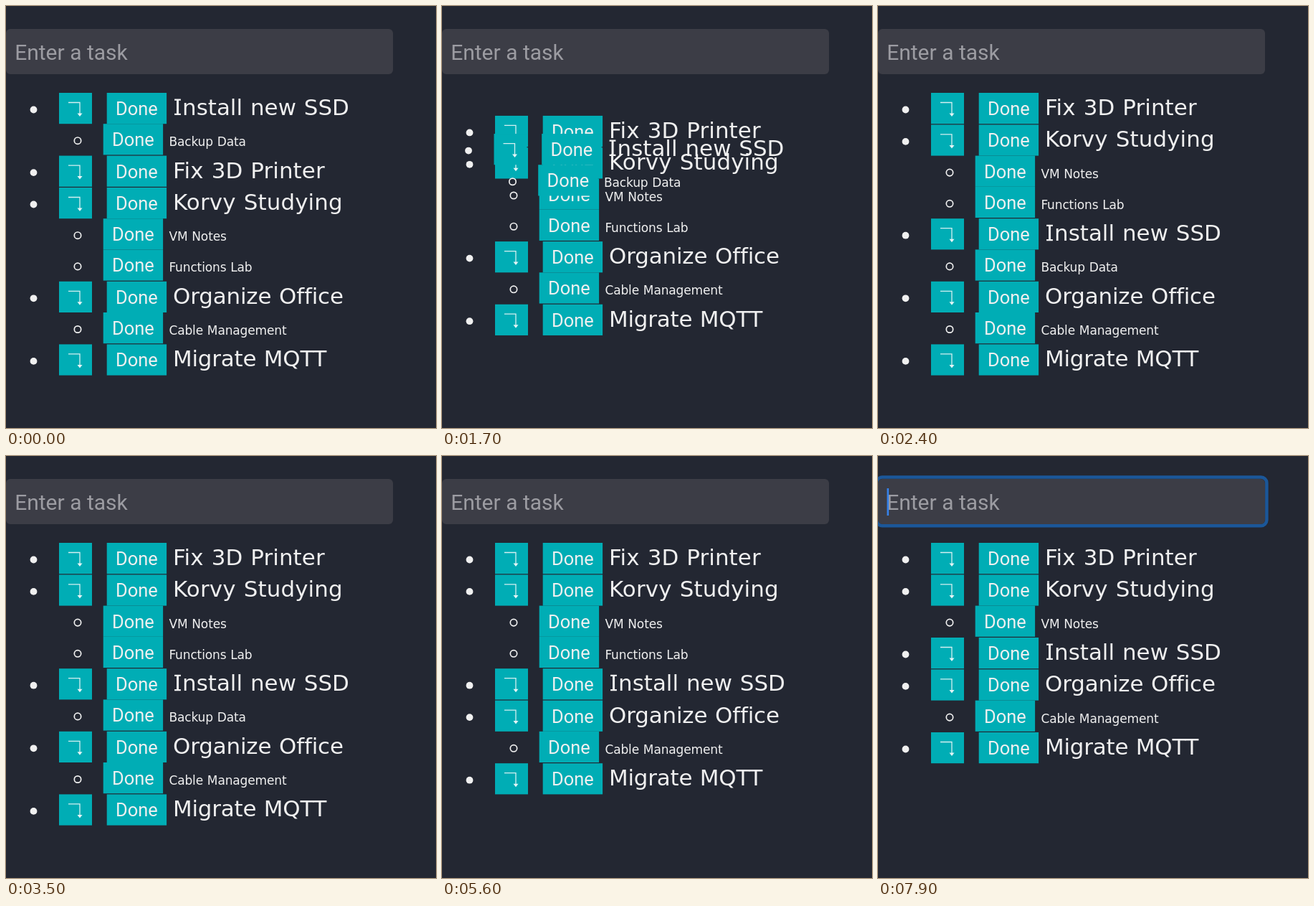
Write an HTML page that moves like this. It is 600x588 px and loops after 8000 ms.

```html
<!DOCTYPE html>
<html lang="en">
<head>
<meta charset="utf-8">
<title>Task list</title>
<style>
  html, body { margin: 0; width: 100%; height: 100%; overflow: hidden; background: #232732; }
  svg { display: block; width: 100%; height: 100%; }
  text { fill: #f0f0f0; font-kerning: none; font-variant-ligatures: none; white-space: pre; }
  .task { font: 30.9px "DejaVu Sans", Verdana, sans-serif; word-spacing: .034em; }
  .sub { font: 17px "DejaVu Sans", Verdana, sans-serif; word-spacing: .034em; letter-spacing: -.13px; }
  .done { font: 25.4px Roboto, Arial, sans-serif; text-anchor: middle; }
  .hint { font: 30px Roboto, Arial, sans-serif; fill: #9c9ca2; }
  .button { fill: #00adb5; }
  .arrow { fill: none; stroke: #d5f0f1; stroke-width: 1.3; }
  .head { fill: #e4f5f6; }
  .dot { fill: #f0f0f0; }
  .ring { fill: none; stroke: #f0f0f0; stroke-width: 1.7; }
  .serif { stroke: #f0f0f0; stroke-width: 2.3; }
  #focus { fill: none; stroke: #1b5799; stroke-width: 4.5; }
  #caret { fill: #3682ea; }
</style>
</head>
<body>
<svg viewBox="0 0 600 588">
  <rect width="600" height="588" fill="#232732"/>
  <rect y="32" width="540" height="63" rx="6" fill="#3c3d46"/>
  <text class="hint" x="12.2" y="74.6">Enter a task</text>
  <rect id="focus" x="-2.2" y="29.6" width="544.6" height="67.6" rx="8"/>
  <rect id="caret" x="12.5" y="45" width="2.6" height="38"/>
  <g id="list"></g>
</svg>
<script>
const LOOP = 8000, STEP = 100;
const TOP = 121, ROW = 44.4, SUB = 43.2, BASE = 31, MIDDLE = 23.5;
const DRAG = [1452, 2102], CLOSE = 1640, REOPEN = 1840, SHIFT = 210;
const BACKUP_DONE = 3900, LAB_DONE = 5900, FOCUS = 7800;

const byId = id => document.getElementById(id);
const list = byId("list");
const clamp = v => Math.max(0, Math.min(1, v));
const smooth = v => v * v * (3 - 2 * v);
const easeOut = v => 1 - (1 - v) ** 3;
const place = (el, x, y) => el.setAttribute("transform", `translate(${x} ${y})`);
const show = (el, on) => el.setAttribute("visibility", on ? "visible" : "hidden");

function add(parent, tag, attrs, content) {
  const el = document.createElementNS("http://www.w3.org/2000/svg", tag);
  for (const key in attrs) el.setAttribute(key, attrs[key]);
  if (content) el.textContent = content;
  parent.append(el);
  return el;
}

function button(g, x, width) {
  add(g, "rect", { class: "button", x, width, height: SUB });
}

function doneButton(g, x) {
  button(g, x, 83.4);
  add(g, "text", { class: "done", x: x + 41.7, y: BASE }, "Done");
}

function makeSub(parent, label) {
  const g = add(parent, "g", {});
  add(g, "circle", { class: "ring", cx: 100, cy: MIDDLE, r: 4.7 });
  doneButton(g, 135.7);
  add(g, "text", { class: "sub", x: 227.4, y: BASE }, label);
  return { el: g, gone: Infinity };
}

function makeTask(label, subs, spacing = 0) {
  const g = add(list, "g", {});
  add(g, "circle", { class: "dot", cx: 38.5, cy: MIDDLE, r: 4.9 });
  button(g, 74, 46);
  add(g, "path", { class: "arrow", d: "M87 13.5H103V29" });
  add(g, "path", { class: "head", d: "M99.5 28.5h7l-3.5 4.5z" });
  doneButton(g, 140.7);
  const text = add(g, "text", { class: "task", x: 233, y: BASE, "letter-spacing": spacing });
  if (label[0] === "I") {
    // The capital I carries serifs
    add(text, "tspan", { dx: 1.95 }, "I");
    add(text, "tspan", { dx: 1.95 }, label.slice(1));
    add(g, "path", { class: "serif", d: `M235.1 ${BASE - 1.15}h8.8M235.1 ${BASE - 21.4}h8.8` });
  } else {
    text.textContent = label;
  }
  return { el: g, subs: subs.map(s => makeSub(g, s)) };
}

const fix = makeTask("Fix 3D Printer", [], .1);
const study = makeTask("Korvy Studying", ["VM Notes", "Functions Lab"], .15);
const office = makeTask("Organize Office", ["Cable Management"], -.14);
const migrate = makeTask("Migrate MQTT", [], -.2);
const install = makeTask("Install new SSD", ["Backup Data"], .03);
install.subs[0].gone = BACKUP_DONE;
study.subs[1].gone = LAB_DONE;

function layoutSubs(task, t) {
  let y = 0;
  for (const sub of task.subs) {
    const on = t < sub.gone;
    show(sub.el, on);
    if (on) place(sub.el, 0, y += SUB);
  }
  return ROW + y;
}

function render(t) {
  const drag = clamp((t - DRAG[0]) / (DRAG[1] - DRAG[0]));
  const closed = easeOut(clamp((t - CLOSE) / SHIFT));
  const reopened = easeOut(clamp((t - REOPEN) / SHIFT));
  const space = layoutSubs(install, t);

  let y = TOP + space * (1 - closed);
  for (const task of [fix, study, office, migrate]) {
    if (task === office) {
      const goal = TOP + ROW + layoutSubs(study, t);
      const from = drag < 1 ? TOP : goal;
      place(install.el, -1.6 * Math.sin(Math.PI * drag), from + (goal - from) * smooth(drag));
      y += space * reopened;
    }
    place(task.el, 0, y);
    y += layoutSubs(task, t);
  }

  const focused = t >= FOCUS;
  show(byId("focus"), focused);
  show(byId("caret"), focused);
  byId("focus").setAttribute("opacity", t < FOCUS + STEP ? .6 : 1);
}

function tick(now) {
  render(Math.floor((now % LOOP) / STEP) * STEP);
  requestAnimationFrame(tick);
}
render(0);
requestAnimationFrame(tick);
</script>
</body>
</html>
```
